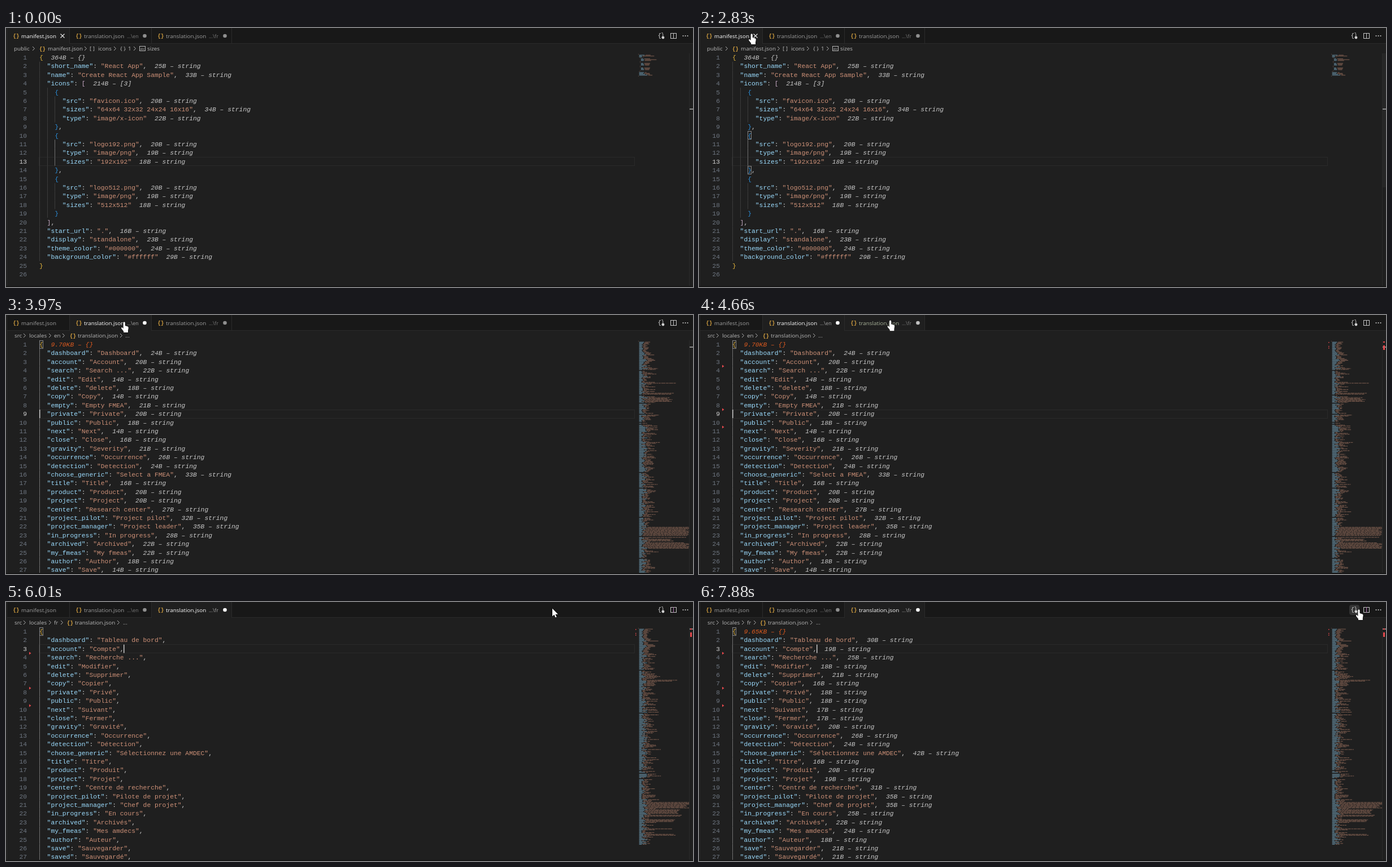
An HTML page with a canvas for the animation above (8000 ms loop, 1216 by 460 pixels).

```html
<!DOCTYPE html>
<html lang="en">
<head>
<meta charset="utf-8">
<title>JSON size annotations</title>
<style>
html, body { margin: 0; width: 100%; height: 100%; overflow: hidden; background: #1f1f1f; }
canvas { display: block; }
</style>
</head>
<body>
<canvas id="stage" width="1216" height="460"></canvas>
<script>
const ctx = document.getElementById('stage').getContext('2d');
const LOOP = 8000, LEFT = 59, CHAR = 6.8, LINE = 15.4;
const MONO = '"Liberation Mono", monospace';
const CODE = '11.333px ' + MONO;
const UI = '9.85px "Open Sans", sans-serif';
const KEY = '#9cdcfe', STRING = '#ce9178';
const BRACKETS = ['#e3b53c', '#c3a6c1', '#2b8fdc'];

const manifest = `{
  "short_name": "React App",
  "name": "Create React App Sample",
  "icons": [
    {
      "src": "favicon.ico",
      "sizes": "64x64 32x32 24x24 16x16",
      "type": "image/x-icon"
    },
    {
      "src": "logo192.png",
      "type": "image/png",
      "sizes": "192x192"
    },
    {
      "src": "logo512.png",
      "type": "image/png",
      "sizes": "512x512"
    }
  ],
  "start_url": ".",
  "display": "standalone",
  "theme_color": "#000000",
  "background_color": "#ffffff"
}
`.split('\n');

const keys = ('dashboard account search edit delete copy empty private public next close gravity occurrence ' +
  'detection choose_generic title product project center project_pilot project_manager in_progress ' +
  'archived my_fmeas author save saved').split(' ');
const enWords = ('Dashboard|Account|Search ...|Edit|delete|Copy|Empty FMEA|Private|Public|Next|Close|Severity|' +
  'Occurrence|Detection|Select a FMEA|Title|Product|Project|Research center|Project pilot|Project leader|' +
  'In progress|Archived|My fmeas|Author|Save').split('|');
const frWords = ('Tableau de bord|Compte|Recherche ...|Modifier|Supprimer|Copier|Privé|Public|Suivant|Fermer|' +
  'Gravité|Occurrence|Détection|Sélectionnez une AMDEC|Titre|Produit|Projet|Centre de recherche|' +
  'Pilote de projet|Chef de projet|En cours|Archivés|Mes amdecs|Auteur|Sauvegarder|Sauvegardé').split('|');
const toLines = (names, words) => ['{', ...words.map((w, i) => `  "${names[i]}": "${w}",`)];

// crumbs: [x, text]; long: minimap bands of wide lines as [from, to, length]
const docs = [
  { lines: manifest, total: 26, notes: { 0: '364B – {}', 3: '214B – [3]' }, row: 12, caretX: 222, ruler: 144, long: [],
    crumbs: [[14, 'public'], [47, '>'], [59, '{}'], [74, 'manifest.json'], [139, '>'], [148, '[ ]'], [163, 'icons'],
      [191, '>'], [202, '{ }'], [216, '1'], [226, '>'], [250, 'sizes']] },
  { lines: toLines(keys, enWords), total: 260, notes: { 0: '9.70KB – {}' }, row: 8, caretX: 59, ruler: 57, deleted: [91, 168, 199],
    long: [[120, 121.5, 75], [138, 140, 75], [146, 153, 68], [375, 395, 110], [397, 401, 70], [403, 414, 110]],
    crumbs: [[15, 'src'], [31, '>'], [41, 'locales'], [76, '>'], [85, 'en'], [100, '>'], [113, '{}'],
      [127, 'translation.json'], [202, '>'], [211, '...']] },
  { lines: toLines(keys.filter(k => k !== 'empty'), frWords), total: 238, notes: { 0: '9.65KB – {}' }, row: 2, caretX: 208,
    ruler: 48, deleted: [91, 153, 184],
    long: [[138, 140, 78], [355, 366, 112], [368, 375, 90], [378, 381, 102], [386, 390, 75], [402, 404, 70], [412, 414, 85]],
    crumbs: [[15, 'src'], [31, '>'], [41, 'locales'], [76, '>'], [85, 'fr'], [97, '>'], [108, '{}'],
      [122, 'translation.json'], [197, '>'], [207, '...']] }
];

const pointerPath = [
  [1090, 262, 34], [1370, 150, 18], [1780, 59, 9], [2780, 59, 9], [2830, 92, 9], [3370, 204, 11],
  [3900, 204, 11], [3970, 208, 11], [4700, 345, 8], [5830, 345, 8], [6010, 966, 10], [6170, 966, 10],
  [6600, 1166, 9], [6870, 1168, 10], [7100, 1168, 10], [7200, 1181, 8], [7290, 1181, 8], [7400, 1167, 12]
];
const clicks = [[2050, 2200], [3560, 3700], [4740, 4925], [7560, 7690]];
const hand = new Path2D('M-1.6 1Q0-1.4 1.6 1V6.5L6 7.8Q7.8 8.6 7.6 10.5L6.8 15V18.5H-1V16.5L-5 11.5Q-5.6 9.2-3.6 9.6L-1.6 11.5Z');
const arrow = new Path2D('M0 0V14L3.3 11 5.5 16 7.6 15 5.4 10.3H10Z');

const between = (t, a, b) => t >= a && t < b;
const random = n => { const v = Math.sin(n * 12.9898) * 43758.5453; return v - Math.floor(v); };

function rect(x, y, w, h, color) { ctx.fillStyle = color; ctx.fillRect(x, y, w, h); }
function text(str, x, y, color, font = UI) {
  ctx.font = font;
  ctx.fillStyle = color;
  ctx.fillText(str, x, y);
}
function disc(x, y, r, color) {
  ctx.fillStyle = color;
  ctx.beginPath();
  ctx.arc(x, y, r, 0, 7);
  ctx.fill();
}
function stroke(points, color, width = 1) {
  ctx.strokeStyle = color;
  ctx.lineWidth = width;
  ctx.beginPath();
  points.forEach(([x, y, move]) => move ? ctx.moveTo(x, y) : ctx.lineTo(x, y));
  ctx.stroke();
}
function outline(x, y, w, h, color) {
  ctx.strokeStyle = color;
  ctx.lineWidth = 1;
  ctx.strokeRect(x, y, w, h);
}

function pointerAt(t) {
  const i = pointerPath.findIndex(p => p[0] > t);
  if (i === 0) return null;
  const [t1, x1, y1] = i < 0 ? pointerPath.at(-1) : pointerPath[i];
  if (i < 0) return { x: x1, y: y1 };
  const [t0, x0, y0] = pointerPath[i - 1], k = (t - t0) / (t1 - t0);
  return { x: x0 + (x1 - x0) * k, y: y0 + (y1 - y0) * k };
}

function drawTabs(active, pointer) {
  rect(0, 0, 1216, 28, '#181818');
  rect(0, 27, 1216, 1, '#2b2b2b');
  const tabs = [[1, 112, 'manifest.json'], [113, 257, 'translation.json', '...\\en'], [258, 399, 'translation.json', '...\\fr']];
  tabs.forEach(([left, right, name, folder], i) => {
    const on = i === active, hover = pointer && pointer.y < 28 && between(pointer.x, left, right);
    if (on || hover) rect(left, 0, right - left, on ? 28 : 27, '#1f1f1f');
    rect(right, 0, 1, 28, '#2b2b2b');
    const x = i ? left + 25 : 27;
    text('{}', x - 14.5, 16.5, '#d9a441', 'bold 9px ' + MONO);
    text(name, x, 17.5, on ? '#ffffff' : hover ? '#a9b39a' : '#9d9d9d');
    if (folder) {
      text(folder, x + 76, 17.5, on ? '#a5a5a5' : '#777777', '8.9px "Open Sans", sans-serif');
      disc(right - 11.5, 14, 3.3, on ? '#ffffff' : hover ? '#c0c0c0' : '#8f8f8f');
    } else if (on) {
      stroke([[96.5, 10.5, 1], [103.5, 17.5], [103.5, 10.5, 1], [96.5, 17.5]], '#e6e6e6', 1.2);
    }
  });
}

function drawActions(t, pointer) {
  const hover = pointer && between(pointer.x, 1150, 1192) ? (pointer.x < 1172 ? 1151 : 1172) : 0;
  if (hover) {
    ctx.fillStyle = '#333333';
    ctx.beginPath();
    ctx.roundRect(hover, 5, 18, 18, 4);
    ctx.fill();
  }
  text('{', 1153.5, 17, '#d0d0d0', '11px ' + MONO);
  text('}', 1159.5, 15, '#d0d0d0', '9px ' + MONO);
  disc(1163, 17, 2.4, '#d0d0d0');
  outline(1176.5, 9.5, 10, 9, '#c5c5c5');
  rect(1181, 9, 1, 10, t > 5870 ? '#b77bb9' : '#c5c5c5');
  for (let i = 0; i < 3; i++) disc(1198.5 + i * 4, 14, 1, '#d0d0d0');
}

function drawCrumbs(doc, first) {
  for (const [x, str] of doc.crumbs) {
    if (str === '>') stroke([[x, 33, 1], [x + 3.5, 36.5], [x, 40]], '#b0b0b0');
    else if (str === '{}') text(str, x, 39.5, '#d9a441', 'bold 9px ' + MONO);
    else text(str, x, 40, '#b8b8b8');
  }
  if (first) {
    outline(236.5, 32.5, 10, 8, '#b5b5b5');
    text('abc', 237.5, 38.5, '#b5b5b5', '5px "Open Sans", sans-serif');
  }
}

function drawCode(doc, index, annotated) {
  const top = 44.4 + doc.row * LINE;
  outline(58.5, Math.round(top) + .5, 1054, 15, '#2a2a2a');
  doc.lines.forEach((line, i) => {
    const y = 56 + i * LINE, number = String(i + 1);
    const indent = Math.max(0, line.search(/\S/));
    text(number, 37 - number.length * CHAR, y, i === doc.row ? '#d0d0d0' : '#6e7681', CODE);
    for (let col = 0; col < indent; col += 2) {
      const lit = index ? col === 0 : col === 4 && between(i, 10, 13);
      rect(Math.round(LEFT + col * CHAR), 44.4 + i * LINE, 1, LINE, lit ? '#707070' : '#3c3c3c');
    }
    for (const m of line.matchAll(/"[^"]*"|[{}\[\]]|[:,]/g)) {
      const s = m[0];
      const color = /[{}\[\]]/.test(s) ? BRACKETS[indent / 2]
        : s[0] !== '"' ? '#cccccc' : line[m.index + s.length] === ':' ? KEY : STRING;
      text(s, LEFT + m.index * CHAR, y, color, CODE);
    }
    const size = line.trim().replace(/,$/, '').length;
    const note = doc.notes[i] || (line.includes('": "') && size + 'B – string');
    if (annotated && note) {
      text(note, LEFT + (line.length + 2) * CHAR, y, note.includes('KB') ? '#dd5a1f' : '#c8c8c8', 'italic ' + CODE);
    }
  });
}

function drawMinimap(doc, index) {
  ctx.globalAlpha = .5;
  const bar = (col, n, y, color) => rect(1119 + col * .81, y, Math.min(n * .81, 1209 - 1119 - col * .81), 1.1, color);
  for (let i = 0; i < doc.total; i++) {
    const y = 46 + i * 1.62, line = doc.lines[i], seed = i * 7 + index * 901;
    if (y > 458) break;
    if (line !== undefined) {
      for (const m of line.matchAll(/"[^"]*"|[{}\[\]]/g)) {
        bar(m.index, m[0].length, y, line[m.index + m[0].length] === ':' ? KEY : STRING);
      }
      continue;
    }
    if (random(seed) < .05) continue;
    const band = doc.long.find(b => between(y, b[0], b[1]));
    const keyLength = 5 + random(seed + 1) ** 2 * 14;
    const end = band ? band[2] * (.9 + random(seed + 2) * .2) : keyLength + 8 + random(seed + 2) ** 2 * 26;
    bar(2, keyLength, y, KEY);
    for (let col = keyLength + 4, k = 3; col < end && col < 111; k++) {
      const word = 3 + random(seed + k) * 7;
      bar(col, Math.min(word, end - col), y, STRING);
      col += word + 1;
    }
  }
  ctx.globalAlpha = 1;
}

function drawDeletions(doc) {
  const red = '#e5484d';
  for (const y of doc.deleted) {
    ctx.fillStyle = red;
    ctx.fill(new Path2D(`M41 ${y - 2.5}L44.5 ${y}L41 ${y + 2.5}Z`));
  }
  for (const y of [48, 55, 58]) rect(1114, y, 1.5, 1.5, red);
  rect(1211, 47, 3, 2, red);
  rect(1211, 54, 3, 8, red);
}

function drawPointer(t, { x, y }) {
  if (clicks.some(([a, b]) => between(t, a, b))) disc(x, y + 4, 9.7, 'rgba(255,235,0,.55)');
  ctx.save();
  ctx.translate(x + 1, y + 1.5);
  const shape = between(x, 400, 1150) ? arrow : hand;
  ctx.fillStyle = '#ffffff';
  ctx.strokeStyle = '#000000';
  ctx.lineWidth = 1;
  ctx.stroke(shape);
  ctx.fill(shape);
  ctx.restore();
}

function draw(t) {
  const index = t < 3600 ? 0 : t < 4850 ? 1 : 2, doc = docs[index], pointer = pointerAt(t);
  rect(0, 0, 1216, 460, '#1f1f1f');
  drawTabs(index, pointer);
  drawActions(t, pointer);
  drawCrumbs(doc, !index);
  drawCode(doc, index, index < 2 || t >= 7620);
  drawMinimap(doc, index);

  rect(1209, 45, 1, 415, '#2b2b2b');
  if (!index) {
    ctx.globalAlpha = Math.min(1, Math.max(0, (t - 670) / 80));
    rect(1210, 45, 6, 238, '#262626');
    ctx.globalAlpha = 1;
  }
  rect(1210, doc.ruler - 1, 6, 2, '#8c8c8c');
  rect(0, 0, 1, 460, '#181818');
  rect(1, 0, 1, 460, '#2b2b2b');
  rect(0, 458, 1216, 2, '#161616');

  const matched = [t >= 2100 ? [[9, 4], [13, 4]] : [], [[0, 0]], t >= 4925 ? [[0, 0]] : []][index];
  for (const [row, col] of matched) {
    outline(Math.round(LEFT + col * CHAR) + .5, Math.round(44.8 + row * LINE) + .5, 6, 14, '#888888');
  }
  if (between(t, 4300, 4850) || t >= 5440) drawDeletions(doc);

  const focused = [2055, 3600, 4855][index], onTime = index === 2 ? 540 : 510;
  if (t >= focused && (t - focused) % 1005 < onTime) {
    rect(doc.caretX, 44.8 + doc.row * LINE, 1.5, 15, '#c8c8c8');
  }
  if (pointer) drawPointer(t, pointer);
}

const start = performance.now();
function tick() {
  draw((performance.now() - start) % LOOP);
  requestAnimationFrame(tick);
}
tick();
</script>
</body>
</html>
```
